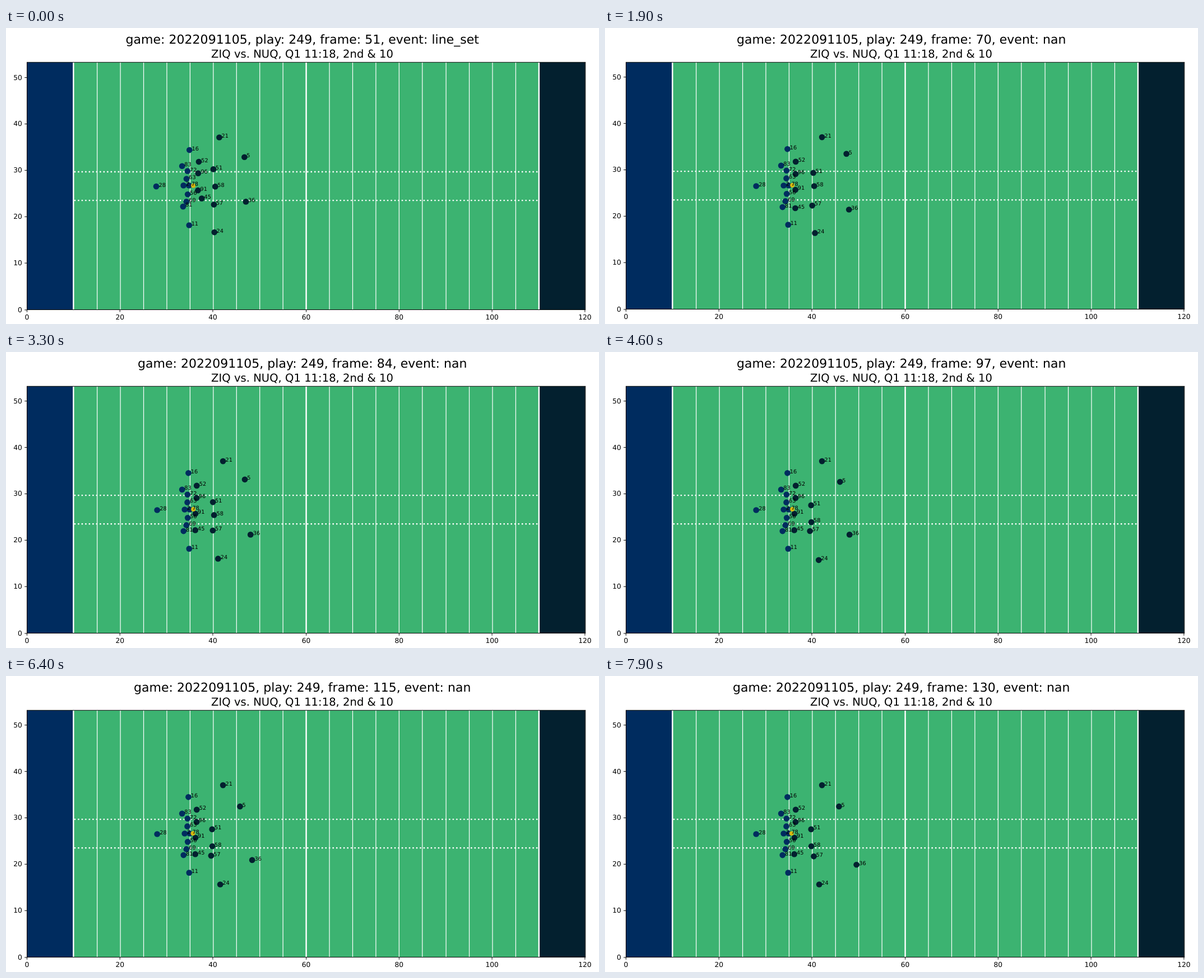
An HTML page with a canvas for the animation above (8 s loop, 1058 px wide and 529 px high).

```html
<!DOCTYPE html>
<html lang="en">
<head>
<meta charset="utf-8">
<title>Play tracking</title>
<style>
html, body { margin: 0; width: 100%; height: 100%; overflow: hidden; background: #fff; }
canvas { display: block; }
</style>
</head>
<body>
<canvas id="stage" width="1058" height="529"></canvas>
<script>
const ctx = document.getElementById('stage').getContext('2d');

// The chart is laid out at 1200 x 600 and 100 dpi, then scaled to the stage.
const SCALE = 1058 / 1200, PT = 100 / 72;
const STEP = 100, STEPS = 80, FIRST_COUNT = 51;
const LEFT = 42.35, YARD_X = 9.413, YARD_Y = 9.407, TOP = 69.5;
const NAVY = '#002c5f', DARK = '#03202f', GREEN = '#3cb371', GOLD = '#d6b60f';

// A move eases a player by dx, dy yards between two times.
const move = (from, to, dx, dy) => ({ from, to, dx, dy });
const settle = (dx, dy) => move(0, 1900, dx, dy);
const player = (label, x, y, ...moves) => ({ label, x, y, moves });

const home = [
  player('28', 27.8, 26.56, settle(0.2, -0.03)),
  player('16', 34.94, 34.41, settle(-0.22, 0.1)),
  player('83', 33.36, 30.95),
  player('72', 34.52, 29.87),
  player('63', 34.3, 28.2, settle(0.19, 0)),
  player('2', 33.66, 26.77, settle(0.25, -0.12)),
  player('78', 34.84, 26.77, settle(0.16, -0.12)),
  player('56', 34.57, 24.86),
  player('69', 34.28, 23.28),
  player('81', 33.57, 22.22, settle(0.1, -0.22)),
  player('11', 34.88, 18.2)
];

const away = [
  player('21', 41.35, 37.13, settle(0.8, -0.06)),
  player('5', 46.76, 32.88, settle(0.64, 0.6), move(1900, 5400, -1.59, -1)),
  player('52', 36.95, 31.88, settle(-0.45, -0.09)),
  player('96', 36.81, 29.39, settle(-0.34, -0.26)),
  player('51', 40.08, 30.27, settle(0.2, -0.9), move(1900, 4300, -0.47, -1.81)),
  player('58', 40.48, 26.53, move(2200, 4700, -0.62, -2.62)),
  player('91', 36.77, 25.71, move(0, 3300, -0.54, 0.03)),
  player('45', 37.58, 23.97, settle(-1.17, -2.2), move(1900, 3300, -0.22, 0.43)),
  player('57', 40.2, 22.65, move(0, 3300, -0.24, -0.52), move(3300, 5600, -0.67, -0.2),
    move(5600, 7900, 1.1, -0.2)),
  player('36', 47.07, 23.27, move(0, 2400, 1, -2.03), move(5600, 8200, 1.55, -1.36)),
  player('24', 40.3, 16.68, move(0, 5600, 1.25, -1))
];

const ball = player('', 35.76, 26.72, move(5600, 7100, -0.16, -0.05));

function positionAt({ x, y, moves }, time) {
  for (const { from, to, dx, dy } of moves) {
    const u = Math.min(1, Math.max(0, (time - from) / (to - from)));
    const eased = u * u * (3 - 2 * u);
    x += dx * eased;
    y += dy * eased;
  }
  return [x, y];
}

const xAt = yd => LEFT + yd * YARD_X;
const snapX = x => Math.round(x) + 0.5;
const snapY = y => Math.floor(y) + 0.5;

function line(x1, y1, x2, y2, color, points) {
  ctx.strokeStyle = color;
  ctx.lineWidth = points * PT;
  ctx.beginPath();
  ctx.moveTo(x1, y1);
  ctx.lineTo(x2, y2);
  ctx.stroke();
}

function text(str, x, y, points, align) {
  ctx.font = `${points * PT}px "DejaVu Sans", sans-serif`;
  ctx.textAlign = align;
  ctx.fillStyle = '#000';
  ctx.fillText(str, x, y);
}

function dot(x, y, radius, color) {
  ctx.fillStyle = color;
  ctx.beginPath();
  ctx.arc(x, y, radius, 0, 2 * Math.PI);
  ctx.fill();
}

function drawField(base) {
  const yAt = yd => base - yd * YARD_Y;
  const block = (from, to, color) => {
    ctx.fillStyle = color;
    ctx.fillRect(xAt(from), TOP, xAt(to) - xAt(from), base - TOP);
  };
  block(0, 120, GREEN);
  block(0, 10, NAVY);
  block(110, 120, DARK);

  for (let yd = 10; yd <= 110; yd += 5) {
    const x = snapX(xAt(yd));
    line(x, TOP, x, base, '#fff', yd % 50 === 10 ? 2 : 1);
  }

  // Hash marks: dots counted from the left edge of the field.
  ctx.setLineDash([2 * PT, 3.3 * PT]);
  ctx.lineDashOffset = xAt(10) - LEFT;
  for (const yd of [23.58, 29.72]) {
    const y = snapY(yAt(yd));
    line(xAt(10), y, xAt(110), y, '#fff', 2);
  }
  ctx.setLineDash([]);

  const left = snapX(LEFT), right = snapX(xAt(120)), tick = 3.5 * PT;
  ctx.strokeStyle = '#000';
  ctx.lineWidth = 0.8 * PT;
  ctx.strokeRect(left, TOP, right - left, base - TOP);

  for (let yd = 0; yd <= 120; yd += 20) {
    const x = Math.floor(xAt(yd)) + 0.5;
    line(x, base, x, base + tick, '#000', 0.8);
    text(yd, x, Math.round(base + 20), 10, 'center');
  }
  for (let yd = 0; yd <= 50; yd += 10) {
    const y = snapY(yAt(yd));
    line(left - tick, y, left, y, '#000', 0.8);
    text(yd, left - 2 * tick, y + 4.5, 10, 'right');
  }
}

function drawPlayers(time, base) {
  const place = p => {
    const [x, y] = positionAt(p, time);
    return [xAt(x), base - y * YARD_Y];
  };
  const drawTeam = (team, color) => team.forEach(p => dot(...place(p), 6.07, color));
  drawTeam(away, DARK);
  drawTeam(home, NAVY);
  dot(...place(ball), 4.5, GOLD);
  for (const p of [...away, ...home]) {
    const [x, y] = place(p);
    text(p.label, Math.round(x + YARD_X / 2), Math.round(y + 0.5), 8, 'left');
  }
}

function draw(step) {
  const opening = step === 0;
  const base = opening ? 571 : 570;
  const event = opening ? 'line_set' : 'nan';
  ctx.setTransform(SCALE, 0, 0, SCALE, 0, 0);
  ctx.textRendering = 'geometricPrecision';
  ctx.fillStyle = '#fff';
  ctx.fillRect(0, 0, 1200, 600);
  drawField(base);
  drawPlayers(step * STEP, base);
  text(`game: 2022091105, play: 249, frame: ${FIRST_COUNT + step}, event: ${event}`, 599.7, 32, 18, 'center');
  text('ZIQ vs. NUQ, Q1 11:18, 2nd & 10', 599.5, 60, 16, 'center');
}

const start = performance.now();
function tick() {
  draw(Math.floor((performance.now() - start) / STEP) % STEPS);
  requestAnimationFrame(tick);
}
tick();
</script>
</body>
</html>
```
